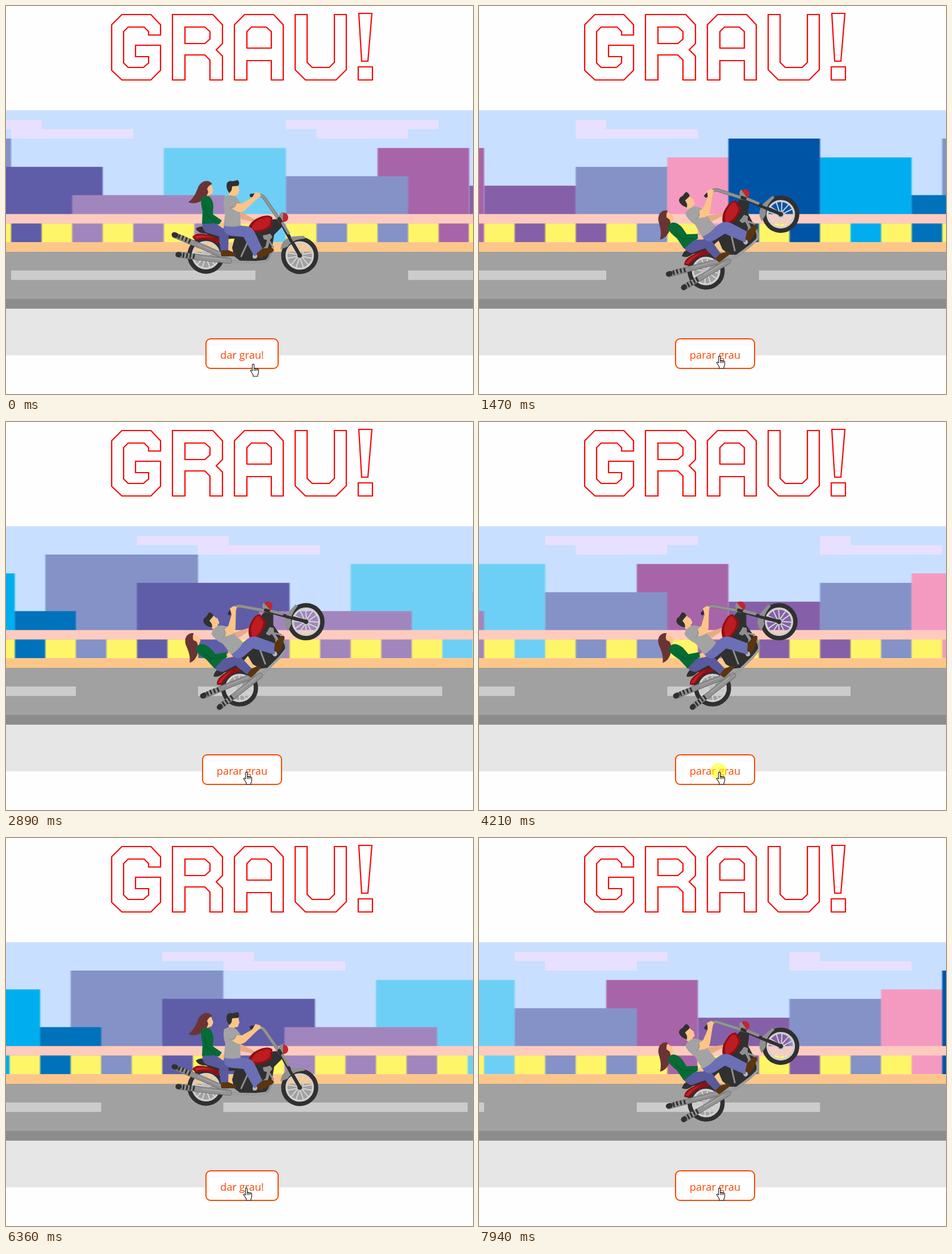
Animation, 822 px wide and 682 px high, one loop 8000 ms. Source, as an HTML page:

```html
<!DOCTYPE html>
<html lang="pt">
<head>
<meta charset="utf-8">
<title>GRAU!</title>
<style>
html, body { margin: 0; width: 100%; height: 100%; overflow: hidden; background: #fefefe; }
svg { display: block; width: 822px; height: 682px; }
.title { fill: none; stroke: #fa0505; stroke-width: 2.2; }
.button rect { fill: #fff; stroke: #ff4500; stroke-width: 2; }
.button text { font: 18.3px "Open Sans", "Noto Sans", sans-serif; fill: #ff4500; text-anchor: middle; }
.line { fill: none; stroke-linecap: round; stroke-linejoin: round; }
.dark { fill: #303030; }
.steel { fill: #8f8f8f; }
.skin { fill: #fdc488; }
.shoe { fill: #5c3510; }
</style>
</head>
<body>
<svg viewBox="0 0 822 682">
  <defs>
    <filter id="soft" color-interpolation-filters="sRGB"><feGaussianBlur stdDeviation=".8 0"/></filter>
    <g id="tile"></g>
    <g id="wheel">
      <circle r="28.7" fill="none" stroke="#303030" stroke-width="8"/>
      <circle r="23.2" fill="none" stroke="#cfcfcf" stroke-width="3.6"/>
      <g id="spokes" class="line" stroke="#d6d6d6" stroke-width="2"></g>
      <circle r="6" fill="#bdbdbd"/>
    </g>
  </defs>

  <g class="title" role="img" aria-label="GRAU!">
    <path d="M204 15H255L272 33V51H251V45L243 37H215L207 45V100L215 108H242L251 100V89H228V69H272V113L255 130H204L186 113V33Z"/>
    <path d="M293 15H364L381 33V66L370 77L381 88V130H359V95L350 86H315V130H293ZM315 37H350L359 45V58L350 66H315Z"/>
    <path d="M402 130V33L420 15H471L488 33V130H467V96H424V130ZM424 74V45L432 37H458L467 45V74Z"/>
    <path d="M509 15H530V99L539 108H569L578 99V15H599V112L581 130H527L509 112Z"/>
    <path d="M621 13H644L637 97H626ZM620 107H645V130H620Z"/>
  </g>

  <rect y="183.3" width="822" height="183" fill="#c8dfff"/>
  <rect y="432" width="822" height="83" fill="#a1a1a1"/>
  <rect y="514.8" width="822" height="17.2" fill="#8c8c8c"/>
  <rect y="532" width="822" height="82.2" fill="#e6e6e6"/>
  <g id="world">
    <use href="#tile"/><use href="#tile" id="before"/><use href="#tile" id="after"/>
  </g>
  <rect y="365.7" width="822" height="16.6" fill="#ffcbbe"/>
  <rect y="415.4" width="822" height="16.6" fill="#fdc689"/>

  <g id="bike">
    <!-- wheels, rear fender, seat -->
    <use href="#wheel" x="352" y="438"/>
    <use href="#wheel" x="517" y="438.5"/>
    <path class="dark" d="M334 391Q344 384 355 391L376 393L384 386L428 396L412 408L372 411L352 400Q338 400 334 391Z"/>
    <path d="M328 406Q333 398 350 401Q368 403 377 413L374 418Q352 406 333 412Z" fill="#8e1014"/>
    <path d="M331 405Q345 400 366 408Q350 405 335 409Z" fill="#c81e21"/>

    <!-- frame and engine -->
    <path class="dark" d="M404 402L442 394L470 375L483 374L486 388L472 402L469 420L462 442L454 448H412L402 440L398 425Z"/>
    <path class="line" d="M384 449L440 450L458 448Q464 444 468 428" stroke="#8f8f8f" stroke-width="4"/>
    <path class="line" d="M384 449L440 450L458 448" stroke="#b6b6b6" stroke-width="1"/>
    <path class="line" d="M455 405L462 411L459 424L440 439" stroke="#8f8f8f" stroke-width="5"/>
    <path class="steel" d="M452 404L465 400L469 406L464 412L454 410Z"/>
    <path class="line" d="M425 416L414 440M464 414L470 424" stroke="#8f8f8f" stroke-width="3"/>
    <circle cx="438" cy="440" r="4" fill="#b9b9b9"/>

    <!-- exhausts -->
    <g class="line">
      <path d="M297 403L350 425L386 441" stroke="#707070" stroke-width="10"/>
      <path d="M300 404L350 425L387 441" stroke="#8f8f8f" stroke-width="8"/>
      <path d="M303 437L350 443L393 448" stroke="#707070" stroke-width="10"/>
      <path d="M306 437L350 443L393 448" stroke="#949494" stroke-width="8"/>
      <path d="M296 402L299 403M303 437L305 437" stroke="#303030" stroke-width="9"/>
      <path d="M306 403L304 408M312 405L310 410M318 408L316 413M324 411L322 416M313 435L312 441M319 436L318 442M325 436L324 442M331 437L330 443" stroke="#303030" stroke-width="3"/>
      <path d="M338 419L382 438M345 441L385 446" stroke="#b2b2b2" stroke-width="1"/>
    </g>

    <!-- passenger -->
    <path d="M346 380L370 379L386 386L392 402L391 432L378 432L375 405L352 398Q344 392 346 380Z" fill="#585a9d"/>
    <path class="shoe" d="M379 430L391 429L403 434Q406 437 403 440H380Q377 436 379 430Z"/>
    <path class="skin" d="M350 315Q361 309 363 319L365 324L362 331L356 333L356 338L347 336Z"/>
    <path d="M363 313Q358 306 349 308Q340 311 336 324Q331 337 321 345Q331 349 341 344Q353 338 356 327L354 321Q357 315 363 313Z" fill="#6b3434"/>
    <path class="skin" d="M374 379L386 382L389 389L382 391L372 384Z"/>
    <path d="M344 337Q354 330 360 337Q365 344 365 353L364 366L380 377L375 384L365 382L345 383L346 361Q342 346 344 337Z" fill="#066b34"/>
    <path class="line" d="M350 350L353 367L370 380" stroke="#04552a" stroke-width="1"/>

    <!-- steering and tank -->
    <path d="M408 359L419 365L438 375L435 379L414 375Z" fill="#eaa984"/>
    <path d="M425 393Q430 377 447 371Q463 365 469 372L468 388Q455 398 438 398Q430 399 425 393Z" fill="#8e1014"/>
    <path d="M432 390Q438 376 452 373Q463 369 466 374L464 385Q455 394 442 394Q435 395 432 390Z" fill="#bd1c20"/>
    <circle cx="488.500" cy="371.500" r="8.300" fill="#c1262c"/>
    <path class="steel" d="M488 362Q480 363 480 371Q480 379 487 381Z"/>
    <path class="line" d="M441 333Q450 331 455 338L487 384" stroke="#747474" stroke-width="6"/>
    <path class="line" d="M441 333Q450 331 455 338L487 384" stroke="#949494" stroke-width="4"/>
    <path class="line" d="M432 333L444 332" stroke="#303030" stroke-width="6"/>
    <path class="line" d="M481 374L494 398L517 438" stroke="#303030" stroke-width="6"/>
    <path class="line" d="M487 382L497 399" stroke="#8f8f8f" stroke-width="5"/>
    <path class="steel" d="M483 428Q485 409 505 405L525 404L526 409Q504 410 496 423Z"/>
    <path class="line" d="M499 408L517 438" stroke="#303030" stroke-width="5"/>
    <circle class="dark" cx="517" cy="438.500" r="4"/>

    <!-- rider -->
    <path d="M384 383L413 386L424 387Q434 389 438 398L453 430L437 440L418 406L396 404Q380 400 384 383Z" fill="#6b6fb6"/>
    <path class="shoe" d="M441 435L452 426L468 425Q474 428 470 432L451 442Q443 445 441 435Z"/>
    <path class="skin" d="M392 314H409L410 321L411 324L408 332L402 333V338L392 337Z"/>
    <path class="dark" d="M389 311Q393 306 399 308L408 306Q412 310 409 316L398 317L397 324L393 329Q386 319 389 311Z"/>
    <path d="M384 336Q393 330 404 335Q413 341 412 354L413 386Q399 390 383 386L386 362Q381 346 384 336Z" fill="#a3a3a3"/>
    <path class="skin" d="M401 344L415 347L433 337L439 327L447 329L449 334L443 338L421 359Q413 365 405 360L394 354Z"/>
    <path d="M390 338Q398 332 407 339L414 347L406 347L403 353L394 359Z" fill="#a3a3a3"/>
    <path class="line" d="M393 355L403 352L405 347" stroke="#8d8d8d" stroke-width="1"/>
  </g>

  <g class="button">
    <rect id="box" y="585" height="52" rx="8"/>
    <text id="label" x="415.500" y="619.500"></text>
  </g>
  <circle id="press" cx="422" cy="614" r="14.500" fill="#ff0" opacity=".55"/>
  <path id="hand" d="M4.500 13V2.500a1.600 1.600 0 0 1 3.200 0V9q1-1.200 2.600 0q1.300-.8 2.500.5q2-.5 2.700 1.200V16q0 2-1.500 4V22.500H6V20q-1-2-3.500-5.500q-2-2.500-.5-3q1.200-.4 2.500 1.500zM7.700 9v4M10.300 9.500v3.500M12.900 10v3" fill="#fff" stroke="#111" stroke-width="1.100" stroke-linejoin="round"/>
</svg>
<script>
const LOOP = 8000, UNIT = 53.75, ROW = 16.57, TOP = 183.3, SPAN = 35;
const el = id => document.getElementById(id);

const sky = '#e9e0ff', mist = '#8492c8', violet = '#8560a8';
// Grid cells: column, row, columns wide, rows high
const cell = (x, y, w, h, fill) =>
  `<rect x="${x * UNIT}" y="${TOP + y * ROW}" width="${w * UNIT}" height="${h * ROW}" fill="${fill}"/>`;

const clouds = [[3, 1, 1], [3, 2, 4], [18, 1, 3], [20, 2, 4], [29, 1, 5], [30, 2, 3]]
  .map(([x, y, w]) => cell(x, y, w, 1, sky));

const houses = [
  [0, 8, 3, violet], [3, 6, 3, mist], [6, 5, 2, '#f49ac1'], [8, 3, 3, '#0054a6'],
  [11, 5, 3, '#00aeef'], [15, 3, 5, mist], [14, 9, 2, '#0072bc'], [18, 6, 5, '#5f5ca8'],
  [25, 4, 4, '#6dcff6'], [22, 9, 5, '#a186be'], [32, 4, 3, '#a864a8'], [29, 7, 4, mist]
].map(([x, y, w, fill]) => cell(x, y, w, 14 - y, fill));

const fence = [cell(3, 12, 1, 2, violet)];
for (let x = 0; x < SPAN; x += x === 6 ? 3 : 2) fence.push(cell(x, 12, 1, 2, '#fff568'));
const dashes = [[9, 7], [20, 8], [33, 6]].map(([x, w]) => cell(x, 17, w, 1, '#cccccc'));

el('tile').innerHTML = [
  ...clouds, '<g filter="url(#soft)">', ...houses, ...fence, '</g>', ...dashes
].join('');
el('before').setAttribute('x', -SPAN * UNIT);
el('after').setAttribute('x', SPAN * UNIT);

el('spokes').innerHTML = Array.from({ length: 6 }, (_, i) =>
  `<path d="M-2 -5L-5 -22M2 -5L5 -22" transform="rotate(${i * 60 + 30})"/>`).join('');

// Scroll advances in even steps between these [time, columns] marks
const marks = [[0, 0], [1470, 15], [2890, 28.88], [4210, 42], [4960, 49], [6360, 63.05], [7940, 78], [8045, 79]];
function scroll(t) {
  const i = marks.findIndex((m, n) => t < marks[n + 1][0]);
  const [t0, p0] = marks[i], [t1, p1] = marks[i + 1];
  const n = Math.round(p1 - p0);
  return p0 + Math.floor((t - t0) / (t1 - t0) * n + 1e-6) * (p1 - p0) / n;
}

// cubic-bezier(.25, .1, .25, 1)
function ease(x) {
  if (x <= 0) return 0;
  if (x >= 1) return 1;
  let lo = 0, hi = 1, s = 0.5;
  for (let i = 0; i < 24; i++) {
    s = (lo + hi) / 2;
    const bx = 0.75 * s * (1 - s) + s ** 3;
    if (bx < x) lo = s; else hi = s;
  }
  return 0.3 * s * (1 - s) ** 2 + 3 * s * s * (1 - s) + s ** 3;
}

const clicks = [940, 4280, 7410], RISE = 1000, PRESS = 130;

function draw(t) {
  const col = (20 + scroll(t)) % SPAN;
  el('world').setAttribute('transform', `translate(${9 - col * UNIT} 0)`);

  const lift = clicks.reduce((sum, c, i) => sum + (i % 2 ? -1 : 1) * ease((t - c) / RISE), 0);
  el('bike').setAttribute('transform', `rotate(${-45 * lift} 417 381.4)`);

  const up = clicks.filter(c => t >= c).length % 2;
  const width = up ? 139 : 127;
  el('box').setAttribute('x', 415.5 - width / 2);
  el('box').setAttribute('width', width);
  el('label').textContent = up ? 'parar grau' : 'dar grau!';

  const pressed = clicks.some(c => t >= c - PRESS && t < c);
  el('press').style.display = pressed ? '' : 'none';
  const move = Math.min(1, Math.max(0, (t - 40) / 220));
  el('hand').setAttribute('transform', `translate(${429 - 12 * move} ${628.5 - 14 * move})`);
}

function tick() {
  draw(performance.now() % LOOP);
  requestAnimationFrame(tick);
}
tick();
</script>
</body>
</html>
```
